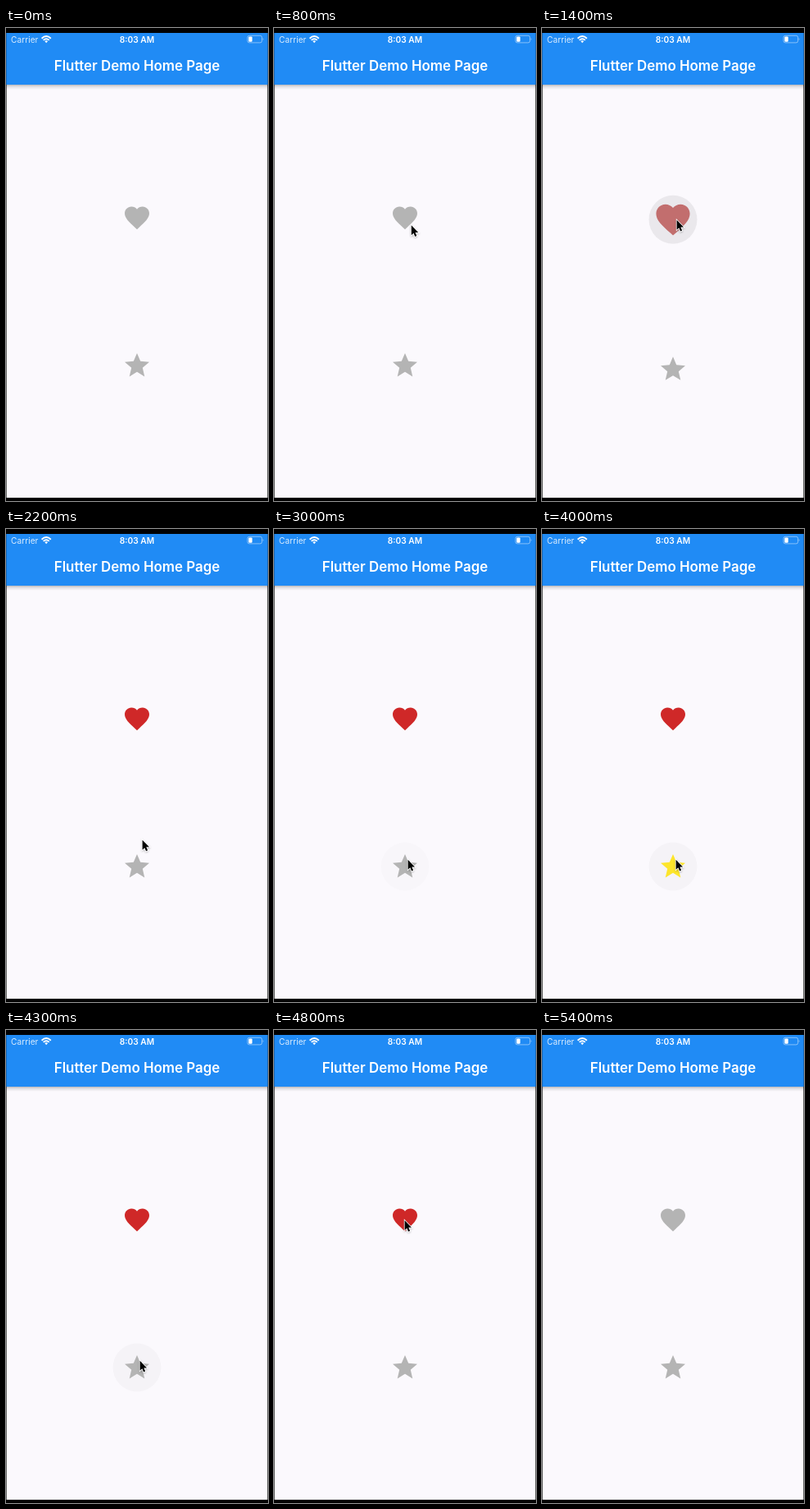
An HTML page that plays this animation: 320 px wide and 576 px high, repeating every 5.9 s.

```html
<!DOCTYPE html>
<html lang="en">
<head>
<meta charset="utf-8">
<title>Flutter Demo Home Page</title>
<style>
  html, body { margin: 0; width: 100%; height: 100%; overflow: hidden; background: #000; }
  svg { display: block; width: 100vw; height: 100vh; }
  text { font-family: Inter, Roboto, sans-serif; fill: #fff; }
</style>
</head>
<body>
<svg viewBox="0 0 320 576">
  <defs>
    <linearGradient id="shade" x2="0" y2="1">
      <stop offset="0" stop-opacity=".26"/>
      <stop offset=".4" stop-opacity=".1"/>
      <stop offset="1" stop-opacity="0"/>
    </linearGradient>
    <filter id="soft" x="-60%" y="-60%" width="220%" height="220%">
      <feDropShadow dx="0" dy="1" stdDeviation="1" flood-opacity=".3"/>
    </filter>
  </defs>

  <rect y="6" width="320" height="566" fill="#fbf9fd"/>
  <rect y="69" width="320" height="6" fill="url(#shade)"/>
  <path d="M.5 69V572M319.5 69V572" stroke="#000" stroke-opacity=".58"/>
  <rect y="6" width="320" height="63" fill="#208bf5"/>
  <path d="M.5 6V69M319.5 6V69" stroke="#000" stroke-opacity=".25"/>

  <text x="6.1" y="17.6" font-size="10.2" fill-opacity=".82">Carrier</text>
  <g fill="none" stroke="#fff" stroke-width="1.9">
    <path d="M43.6 12.7Q49.2 7.3 54.8 12.7M45.7 14.9Q49.2 11.6 52.7 14.9"/>
    <path d="M47.3 16L49.2 18.2L51.1 16Q49.2 14.4 47.3 16Z" fill="#fff" stroke="none"/>
  </g>
  <text x="160" y="17.6" font-size="10.2" font-weight="600" text-anchor="middle">8:03 AM</text>
  <rect x="295" y="9.3" width="17.6" height="8.6" rx="2.2" fill="none" stroke="#fff" stroke-opacity=".5" stroke-width=".9"/>
  <rect x="296.3" y="10.5" width="4.4" height="6.2" rx="1" fill="#fff"/>
  <path d="M313.7 12Q315.4 13.6 313.7 15.2Z" fill="#fff" fill-opacity=".55"/>
  <text x="160" y="52" font-size="16.9" font-weight="600" text-anchor="middle">Flutter Demo Home Page</text>

  <g id="heart">
    <circle r="29.5"/>
    <path d="M12 21.35l-1.45-1.32C5.4 15.36 2 12.28 2 8.5 2 5.42 4.42 3 7.5 3c1.74 0 3.41.81 4.5 2.09C13.09 3.81 14.76 3 16.5 3 19.58 3 22 5.42 22 8.5c0 3.78-3.4 6.86-8.55 11.54z"/>
  </g>
  <g id="star">
    <circle r="29.5"/>
    <path d="M12 17.27L18.18 21l-1.64-7.03L22 9.24l-7.19-.61L12 2 9.19 8.63 2 9.24l5.46 4.73L5.82 21z"/>
  </g>
  <path id="cursor" d="M0 0V12L2.7 9.5L4.5 13.6L6.5 12.7L4.7 8.7H8.4Z" stroke="#fff" stroke-width="1.5" paint-order="stroke" filter="url(#soft)"/>
</svg>
<script>
const LOOP = 5900, STEP = 100, REST = 36, GROWTH = 13.4, RUN = 200;
const GREY = [180, 180, 180];
const byId = id => document.getElementById(id);
const mix = (a, b, k) => a + (b - a) * k;
const progress = (t, from, length) => Math.min(1, Math.max(0, (t - from) / length));
const easeOut = k => 1 - (1 - k) ** 3;

const SHOWN = 200, HIDDEN = 5400;
const entry = { x: 250, y: 408 };
const moves = [
  { from: 200, to: 1100, x: 164, y: 233 },
  { from: 1800, to: 2300, x: 166, y: 379 },
  { from: 2400, to: 3000, x: 163, y: 402 },
  { from: 4500, to: 4800, x: 159, y: 231 },
  { from: 5100, to: 5400, x: 240, y: 180 }
];

// Each button is tapped twice: on, then off. The icon animates from "run".
const buttons = [
  { el: byId("heart"), y: 231.1, color: [207, 40, 40], taps: [
    { press: 1300, run: 1300, glow: .065 }, { press: 4900, run: 5000, glow: .015 }] },
  { el: byId("star"), y: 410.9, color: [253, 229, 43], taps: [
    { press: 3000, run: 3100, glow: .02 }, { press: 4000, run: 4100, glow: .045 }] }
];

const sum = (list, rule) => list.reduce((total, item) => total + rule(item), 0);
const pulse = (t, tap) => 1 - Math.abs(2 * progress(t, tap.run, RUN) - 1);
const glow = (t, { press, glow }) =>
  glow * progress(t, press - 100, 200) * (1 - progress(t, press + 100, 400));

function draw(t) {
  const grow = buttons.map(b => GROWTH * sum(b.taps, tap => pulse(t, tap)));
  // Evenly spaced column: a growing icon pushes both centres.
  const shift = [grow[0] / 6 - grow[1] / 3, grow[0] / 3 - grow[1] / 6];

  buttons.forEach(({ el, y, color, taps: [on, off] }, i) => {
    const [circle, icon] = el.children;
    const lit = progress(t, on.run, RUN) - progress(t, off.run, RUN);
    const rgb = GREY.map((c, j) => Math.round(mix(c, color[j], lit)));
    el.setAttribute("transform", `translate(160 ${y + shift[i]})`);
    circle.setAttribute("fill-opacity", glow(t, on) + glow(t, off));
    icon.setAttribute("transform", `scale(${(REST + grow[i]) / 24}) translate(-12 -12)`);
    icon.setAttribute("fill", `rgb(${rgb})`);
  });

  const { x, y } = moves.reduce((at, move) => {
    const k = easeOut(progress(t, move.from, move.to - move.from));
    return { x: mix(at.x, move.x, k), y: mix(at.y, move.y, k) };
  }, entry);
  const cursor = byId("cursor");
  cursor.setAttribute("transform", `translate(${x + .6} ${y + .8})`);
  cursor.setAttribute("visibility", t >= SHOWN && t < HIDDEN ? "visible" : "hidden");
}

const start = performance.now();
function tick() {
  const t = (performance.now() - start) % LOOP;
  draw(Math.floor(t / STEP) * STEP);
  requestAnimationFrame(tick);
}
tick();
</script>
</body>
</html>
```
